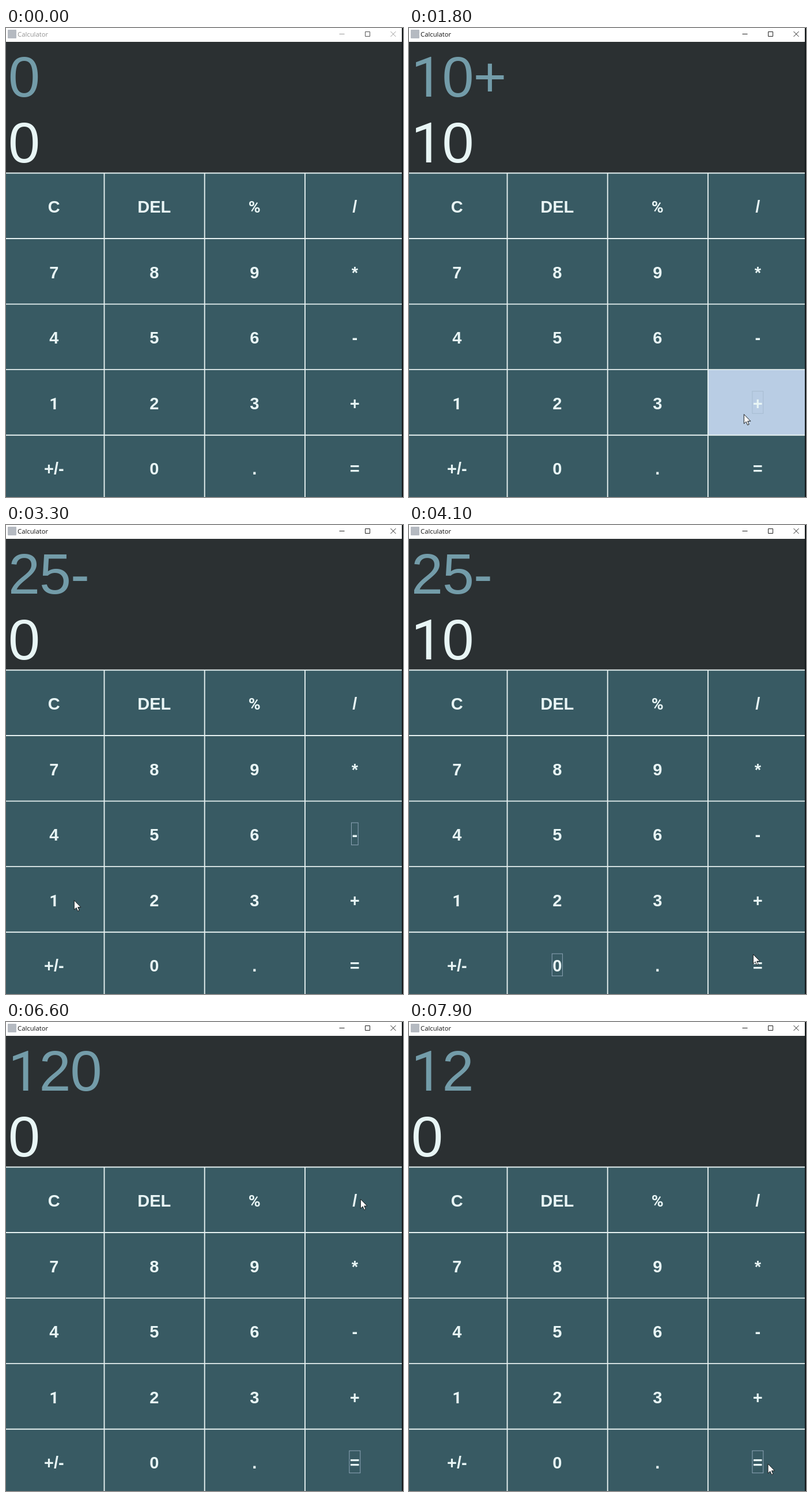
Write an HTML page that moves like this. It is 689 px wide and 813 px high and loops after 8 s.

```html
<!DOCTYPE html>
<html lang="en">
<head>
<meta charset="utf-8">
<title>Calculator</title>
<style>
  html, body { margin: 0; width: 100%; height: 100%; overflow: hidden; background: #fff; }
  svg { display: block; width: 689px; height: 813px; }
  .title { font: 11.3px "Open Sans", "Noto Sans", sans-serif; }
  .display { font: 99px "Liberation Sans", Arial, sans-serif; letter-spacing: -1.1px; }
  .label { font: bold 29px "Liberation Sans", Arial, sans-serif; fill: #e8f5f5; text-anchor: middle; }
  .plain { font-family: Roboto, sans-serif; font-size: .98em; }
  .ctl { fill: none; stroke-width: 1; }
</style>
</head>
<body>
<svg viewBox="0 0 689 813">
  <rect width="689" height="813" fill="#fff"/>
  <rect x="3" y="3" width="15" height="15" rx="1" fill="#b5bac1"/>
  <text id="title" class="title" x="20" y="15">Calculator</text>
  <path id="min" class="ctl" d="M578.5 10.5h9"/>
  <path id="max" class="ctl" d="M623.5 6.5h8v8h-8z"/>
  <path id="close" class="ctl" d="M667.5 6l9 9m0-9l-9 9"/>
  <rect y="24" width="689" height="228" fill="#2b3032"/>
  <text id="top" class="display" x="4" y="118.5" fill="#739ca9"></text>
  <text id="bottom" class="display" x="4" y="232.5" fill="#e8f5f5"></text>
  <rect y="252" width="689" height="561" fill="#385a63"/>
  <rect id="down" width="174.2" height="113.6" fill="#b9cde4"/>
  <path id="grid" fill="none" stroke="#e6f1f1" stroke-width="1.9"/>
  <g id="keys"></g>
  <rect id="focus" height="38.5" fill="none" stroke="#a3b8cc" stroke-opacity=".8"/>
  <rect x="687" width="2" height="813" fill="#111618"/>
  <path id="cursor" d="M0 0V16.3L3.8 12.8L6.3 18.6L8.9 17.5L6.4 11.9H11.6Z"
        fill="#fff" stroke="#15191b" stroke-linejoin="round"/>
</svg>
<script>
const LOOP = 8000, STEP = 100;
const COL = 174.2, ROW = 113.55, LEFT = -3.7, TOP = 251.5;
const $ = id => document.getElementById(id);
const set = (el, attrs) => { for (const k in attrs) el.setAttribute(k, attrs[k]); };
const clamp = (v, lo, hi) => Math.min(hi, Math.max(lo, v));

// The footless 1 and the narrow % come from the second font
const write = (el, text) => {
  el.innerHTML = text.replace(/[1%]/g, '<tspan class="plain">$&</tspan>');
};

const keys = {};
"C DEL % / 7 8 9 * 4 5 6 - 1 2 3 + +/- 0 . =".split(" ").forEach((name, i) => {
  const col = i % 4, row = i >> 2;
  const el = document.createElementNS("http://www.w3.org/2000/svg", "text");
  const key = keys[name] = { el, x: LEFT + col * COL, y: TOP + row * ROW, cx: 83.3 + col * 174, base: 320 + row * ROW };
  write(el, name);
  set(el, { class: "label", x: key.cx, y: key.base });
  $("keys").append(el);
});

let grid = "";
for (let c = 1; c < 4; c++) grid += `M${LEFT + c * COL} ${TOP}V813`;
for (let r = 0; r < 5; r++) grid += `M0 ${TOP + r * ROW}H687`;
set($("grid"), { d: grid });

// key:time in ms, "!" marks a press long enough to light the key
const script = "1:1000! 0:1400 +:1800! 1:2200 5:2500 =:2700 -:2900! 1:3400! 0:3700! "
  + "=:4200! *:4700! 8:5600 =:5800 /:6700! 1:7000 0:7300 =:7700";

// Where the pointer lands, relative to the key's centre
const aim = { 1: [35, 1], 0: [-7, -8], "+": [-24, 20], "=": [-8, -19], 8: [-11, 24], "/": [10, -2] };

const ops = { "+": (a, b) => a + b, "-": (a, b) => a - b, "*": (a, b) => a * b, "/": (a, b) => a / b };

function press({ top, bottom }, name) {
  if (name === "=") {
    const value = ops[top.slice(-1)](parseFloat(top), +bottom);
    return { top: String(value), bottom: "0" };
  }
  if (ops[name]) return { top: (bottom === "0" ? top : bottom) + name, bottom: "0" };
  return { top, bottom: bottom === "0" ? name : bottom + name };
}

let state = { top: "0", bottom: "0" };
const presses = script.split(" ").map(entry => {
  const [name, time] = entry.split(":");
  const [dx, dy] = aim[name] || [-8, 18];
  const key = keys[name], before = state;
  state = press(state, name);
  return {
    key, before, after: state, time: parseInt(time), held: time.endsWith("!"),
    x: key.cx + dx, y: key.base - 11 + dy
  };
});

const stops = [{ time: 0, x: 674, y: 793 }, ...presses, { time: 7950, x: 623, y: 766 }];

// Arrive shortly before each press, after at most half a second of travel
function pointerAt(t) {
  for (let i = 1; i < stops.length; i++) {
    const from = stops[i - 1], to = stops[i], gap = to.time - from.time;
    if (t > to.time) continue;
    const arrive = to.time - Math.min(100, gap / 4);
    const p = clamp(1 - (arrive - t) / clamp(gap - 300, 150, 500), 0, 1);
    const e = p * p * (3 - 2 * p);
    return [from.x + (to.x - from.x) * e, from.y + (to.y - from.y) * e];
  }
  const end = stops[stops.length - 1];
  return [end.x, end.y];
}

function draw(t) {
  const last = presses.filter(p => p.time <= t).pop();
  const lit = last && last.held && t < last.time + STEP;
  const shown = last ? last.after : presses[0].before;
  write($("top"), shown.top);
  write($("bottom"), (lit ? last.before : shown).bottom);

  const active = t >= presses[0].time - STEP;
  set($("title"), { fill: active ? "#111" : "#929292" });
  for (const id of ["min", "max", "close"])
    set($(id), { stroke: active ? "#222" : id === "max" ? "#555" : "#999" });

  set($("down"), { visibility: lit ? "visible" : "hidden" });
  set($("focus"), { visibility: last ? "visible" : "hidden" });
  if (last) {
    const { key } = last, w = key.el.getComputedTextLength() + 2;
    set($("down"), { x: key.x, y: key.y });
    set($("focus"), { x: key.cx - w / 2, y: key.base - 31, width: w });
  }

  const [x, y] = pointerAt(t);
  set($("cursor"), { visibility: t < STEP ? "hidden" : "visible", transform: `translate(${x} ${y})` });
}

const start = performance.now();
function tick() {
  const t = (performance.now() - start) % LOOP;
  draw(Math.floor(t / STEP) * STEP);
  requestAnimationFrame(tick);
}
tick();
</script>
</body>
</html>
```
